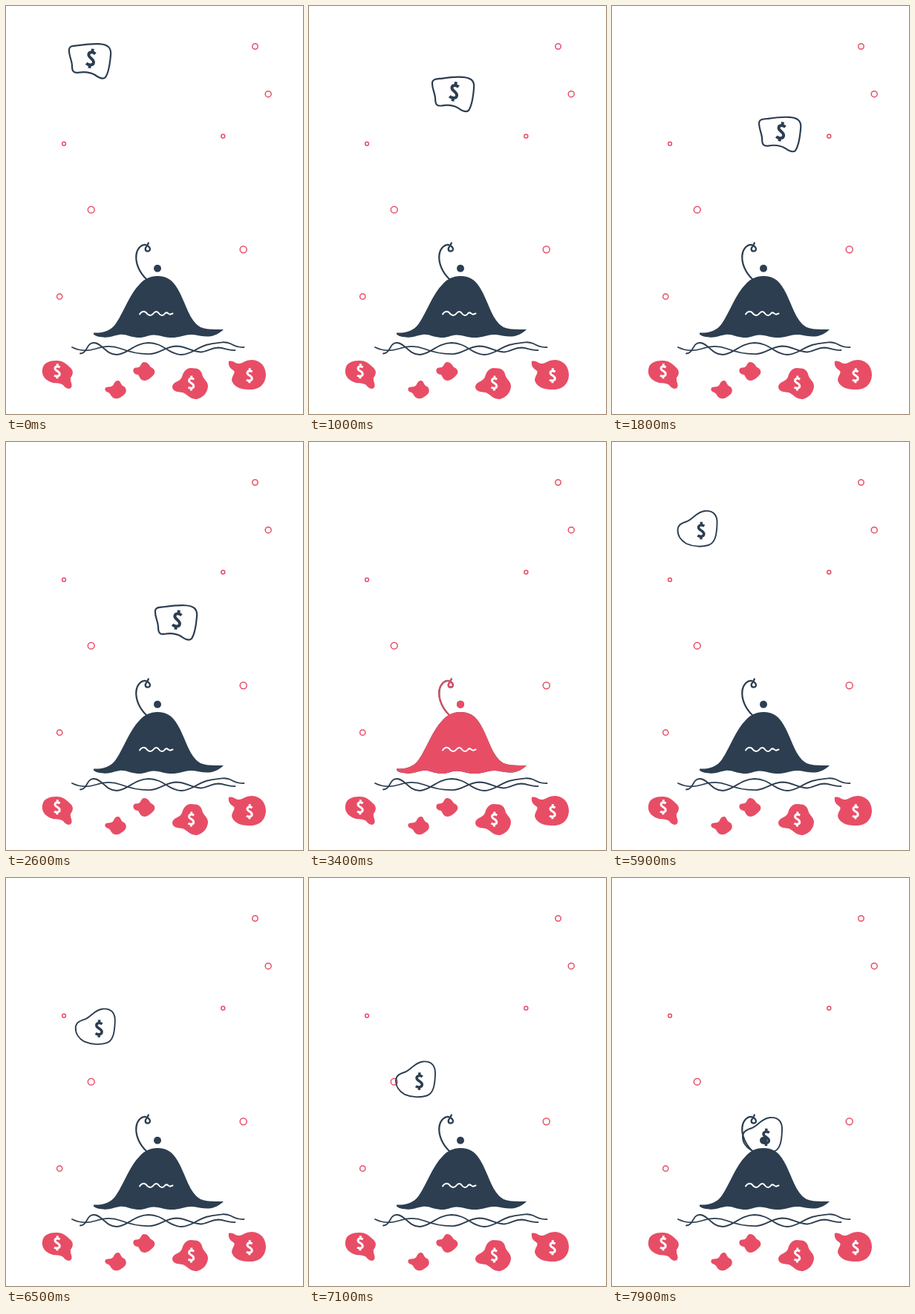
An HTML page for the animation above (8 s loop, 400 by 550 pixels).

```html
<!DOCTYPE html>
<html lang="en">
<head>
<meta charset="utf-8">
<title>Money hill</title>
<style>
html, body { margin: 0; width: 100%; height: 100%; overflow: hidden; background: #fff; }
svg { display: block; width: 100vw; height: 100vh; }
.line { fill: none; stroke-linecap: round; stroke-linejoin: round; }
.dark { stroke: #2c3e50; }
.coin { fill: none; stroke-width: 3.5; }
</style>
</head>
<body>
<svg viewBox="0 0 400 550">
  <defs>
    <path id="dollar" d="M4.3-6.3C1-8.4-3.5-7.8-3.5-4.2C-3.5-.4 3.8 0 3.8 4.3C3.8 8.3-1.4 8.7-4.7 6.6M.3-11.7V-7M-.1 7V11.7"/>
    <path id="hill" d="M118 440.5C131 441 141 438 148 428C160 410 166 389 180 375C186 368 194 364 204 364C216 364 224 369 231 381C242 399 246 424 262 433C271 437 283 435.5 293 436C288 441 281 445 273 445.5C263 446 257 442.5 249 443C239 443.5 232 447.5 221 447C211 446.5 206 443 198 443.5C190 444 187 447.5 177 447C167 446.5 162 442 153 443C145 444 140 447.5 131 446.5C125 446 120 445 118 442.5Z"/>
    <path id="antenna" class="line" d="M190 369C180 360 174 347 175.5 335C177 326 183 321 188 322C194 323.5 196 329.5 191.5 330.5C187 331 186.5 326.5 190 323.5L191.8 319.5"/>
    <circle id="eye" cx="204" cy="353.7" r="5"/>
  </defs>

  <g id="bubbles" fill="none" stroke="#e84d66" stroke-width="1.5"></g>

  <g class="line dark" stroke-width="1.8">
    <path d="M89 460C98 464.5 110 465.5 121 462C132 458 143 457.5 155 462C168 467 182 469.5 195 469C208 468 215 459 229 458.5C243 458.5 252 467 263 466.5C273 465.5 276 460.5 286 460.5C295 461 299 464.5 308.500 464"/>
    <path d="M100 468.500C110 468 108 454.500 118 454C129 453.500 134 470 149 470C163 470 172 454.500 192 454C212 454 220 470 236 470C252 469.500 259 458 274 456C286 454 294 451.500 302 455C308 458.500 313 460.500 320.500 460"/>
  </g>

  <g fill="#e84d66">
    <path d="M49 490C50 481 58 478 68 478C77 478 82 483 86 487C92 492 90 497 87 501C86 506 90 510 88 514C85 518 80 515 77 511C72 507 65 510 58 506C51 502 48 497 49 490Z"/>
    <path d="M151 505C154 505 154 509 157 512C163 514 163 521 159 524C155 527 152 530 147 529C141 528 142 523 138 521C133 520 132 516 135 514C139 513 143 514 145 510C146 507 148 505 151 505Z"/>
    <path d="M186 480C191 480 193 484 195 487C200 489 202 493 199 497C196 500 193 504 187 505C181 505 180 500 178 497C173 497 170 493 172 489C174 486 178 489 181 485C182 482 184 480 186 480Z"/>
    <path d="M248 488C256 488 262 489 264 496C265 503 272 505 272 513C271 522 265 528 257 530C247 530 244 523 238 521C231 520 224 520 224 513C225 506 234 507 237 500C239 493 242 489 248 488Z"/>
    <path d="M300 479C306 477 309 483 315 482C321 480 324 477 332 477C344 478 350 487 350 498C349 511 340 518 326 517C313 517 305 511 304 504C305 497 310 494 306 491C301 488 299 484 300 479Z"/>
  </g>
  <g class="coin" stroke="#fff">
    <use href="#dollar" transform="translate(69 492.300) scale(.85)"/>
    <use href="#dollar" transform="translate(249.500 508.500) scale(.85)"/>
    <use href="#dollar" transform="translate(328 498.300) scale(.85)"/>
  </g>

  <g id="bagA" class="dark">
    <path class="line" stroke-width="2.2" d="M85 58C86 53.500 91 53.700 97 53.200C105 52 115 50.700 125 51.200C137 51.700 142 56 141 66C140 78 138 90 134 96C130 100 124 96 120 93C112 88.500 105 88.500 98 89.700C91 90.700 89 88 89 81C89 73 84 66 85 58Z"/>
    <use href="#dollar" class="coin" transform="translate(114.500 70.700) rotate(9) scale(1.13)"/>
  </g>
  <g id="bagB" class="dark">
    <path class="line" stroke-width="1.9" d="M88.500 118C89 111 95 109 101 107C109 104 114 94 125 93C137 92 142 99 141.500 110C141 125 139 136 130 139C122 141.500 110 141.500 100 137C93 133 88 126 88.500 118Z"/>
    <use href="#dollar" class="coin" transform="translate(120 119.500)"/>
  </g>

  <g fill="#2c3e50">
    <use href="#hill"/>
    <use href="#eye"/>
    <use href="#antenna" class="dark" stroke-width="2.3"/>
  </g>
  <g id="fed" fill="#e84d66">
    <use href="#hill"/>
    <use href="#eye"/>
    <use href="#antenna" stroke="#e84d66" stroke-width="1.9"/>
  </g>
  <path class="line" stroke="#fff" stroke-width="2" d="M180 415.500C182 412 186 410.500 189 413.500C192 418 196 418 198.500 414.500C201 411 204 411 206 414.500C209 418.500 212 417.500 214.500 414C217 411.500 219 416 221 415.700L224.500 414.500"/>
</svg>
<script>
const LOOP = 8000, STEP = 100, EATEN = 3400, NEXT = 5400;
const $ = id => document.getElementById(id);
const show = (el, on) => el.setAttribute('display', on ? 'inline' : 'none');
const move = (el, x, y) => el.setAttribute('transform', `translate(${x.toFixed(2)} ${y.toFixed(2)})`);

$('bubbles').innerHTML = [
  [335.5, 54.5, 3.7], [353.2, 118.7, 4], [292.3, 175.5, 2.5], [78, 185.7, 2.4],
  [114.7, 274.7, 4.4], [319.7, 328.2, 4.5], [72.2, 391.7, 3.6]
].map(([x, y, r]) => `<circle cx="${x}" cy="${y}" r="${r}"/>`).join('');

const bagA = $('bagA'), bagB = $('bagB'), fed = $('fed');

// Both bags follow parabolic paths, advanced ten times a second.
function draw(ms) {
  const t = Math.floor((ms % LOOP) / STEP) * STEP;
  show(bagA, t < EATEN);
  show(fed, t >= EATEN && t < NEXT);
  show(bagB, t >= NEXT);
  const a = t / 1000, b = (t - NEXT) / 1000;
  move(bagA, 103.9 * a - 22.8 * a * a, 31.85 * a + 12.76 * a * a);
  move(bagB, 9.4 - 31.25 * b + 25 * b * b, -79 + 166.6 * b - 17.2 * b * b);
}

const start = performance.now();
function tick() {
  draw(performance.now() - start);
  requestAnimationFrame(tick);
}
tick();
</script>
</body>
</html>
```
